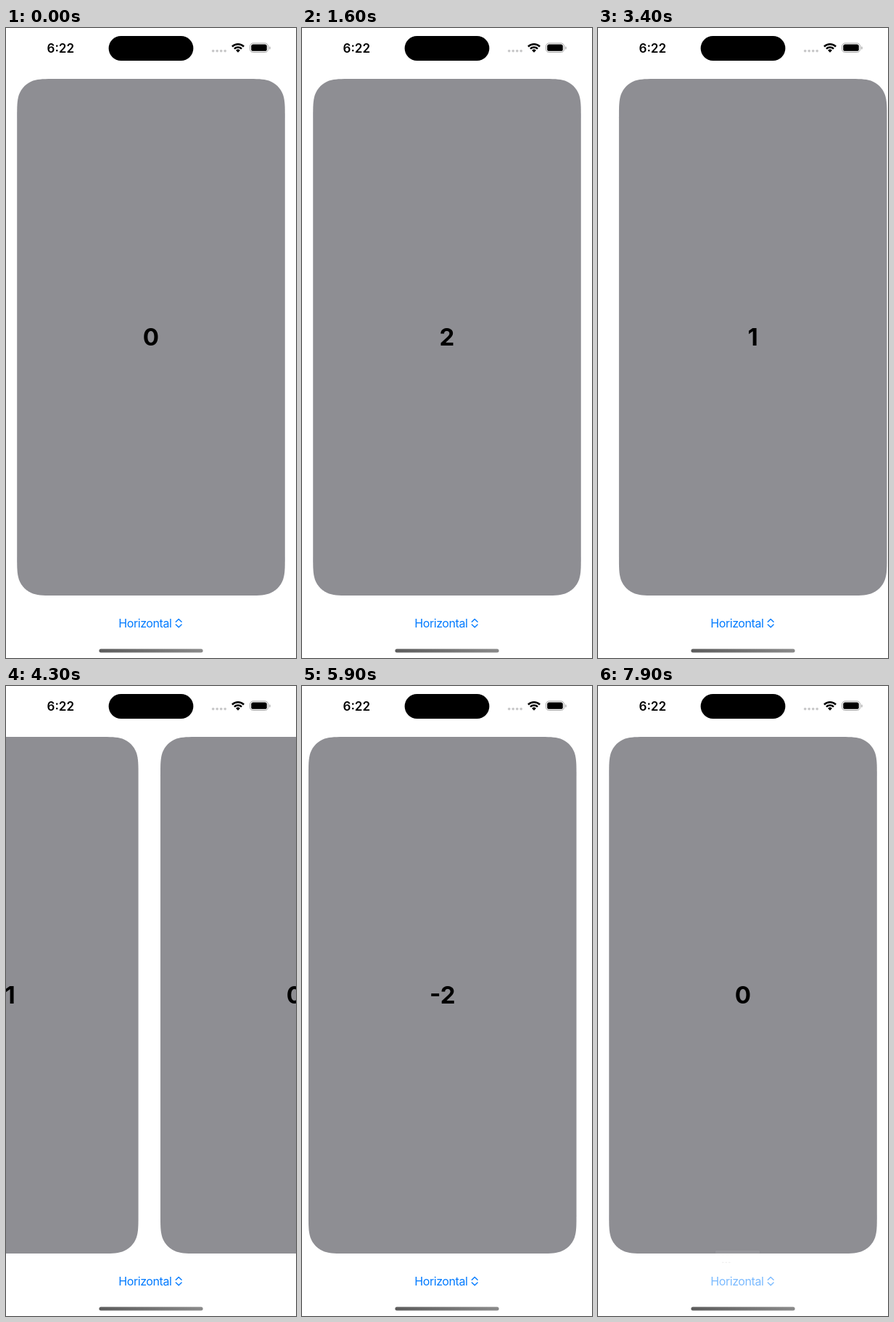
An HTML page with a canvas for the animation above (8000 ms loop, 400 by 867 pixels).

```html
<!DOCTYPE html>
<html lang="en">
<head>
<meta charset="utf-8">
<title>Endless pager</title>
<style>
  html, body { margin: 0; width: 100%; height: 100%; overflow: hidden; background: #fff; }
  canvas { display: block; width: 100vw; height: 100vh; }
</style>
</head>
<body>
<canvas id="stage"></canvas>
<script>
const W = 400, H = 867, LOOP = 8000, TICK = 100;
const FONT = 'Inter, "Open Sans", sans-serif';
const BLUE = '#007aff', GRAY = '#8e8e93';
const CARD = { x: 15.2, y: 70, w: 369.6, h: 711, r: 35 };
const SWIPE = 216;

// Start time of each swipe and the page step it makes
const swipes = [
  [576, 1], [1376, 1], [2576, -1], [3376, -1],
  [4192.8, -1], [5076, -1], [5884, 1], [6749.2, 1]
];

const canvas = document.getElementById('stage');
const ctx = canvas.getContext('2d');

const clamp = v => Math.min(1, Math.max(0, v));
const smooth = u => u * u * (3 - 2 * u);

function pagePosition(t) {
  return swipes.reduce((p, [start, step]) => p + step * smooth(clamp((t - start) / SWIPE)), 0);
}

function pill(x, y, w, h, r, fill) {
  ctx.beginPath();
  ctx.roundRect(x, y, w, h, r);
  ctx.fillStyle = fill;
  ctx.fill();
}

function label(text, x, y, font, fill, align = 'center') {
  ctx.font = `${font} ${FONT}`;
  ctx.fillStyle = fill;
  ctx.textAlign = align;
  ctx.fillText(text, x, y);
}

// One smooth-curvature corner; (ux,uy) runs back along the incoming edge, (vx,vy) along the outgoing one
function corner(x, y, ux, uy, vx, vy, r) {
  const at = (a, b) => [x + r * (a * ux + b * vx), y + r * (a * uy + b * vy)];
  const curve = (a, b, c) => ctx.bezierCurveTo(...at(...a), ...at(...b), ...at(...c));
  ctx.lineTo(...at(1.5287, 0));
  curve([1.0885, 0], [0.8684, 0], [0.6315, 0.0749]);
  curve([0.3728, 0.1691], [0.1691, 0.3728], [0.0749, 0.6315]);
  curve([0, 0.8684], [0, 1.0885], [0, 1.5287]);
}

function card(n, dx) {
  const { y, w, h, r } = CARD, x = CARD.x + dx;
  ctx.beginPath();
  corner(x + w, y, -1, 0, 0, 1, r);
  corner(x + w, y + h, 0, -1, -1, 0, r);
  corner(x, y + h, 1, 0, 0, -1, r);
  corner(x, y, 0, 1, 1, 0, r);
  ctx.closePath();
  ctx.fillStyle = GRAY;
  ctx.fill();
  label(String(n), W / 2 + dx, 437.2, '700 33px', '#000');
}

function pages(t) {
  const pos = pagePosition(t), first = Math.floor(pos);
  for (let n = first; n <= first + 1; n++) {
    const dx = (n - pos) * W;
    if (Math.abs(dx) < W) card(n, dx);
  }
}

function wifi(cx, cy) {
  const a = -Math.PI * 0.75, b = -Math.PI * 0.25;
  ctx.strokeStyle = ctx.fillStyle = '#000';
  ctx.lineWidth = 2.5;
  for (const r of [11.4, 7.2]) {
    ctx.beginPath();
    ctx.arc(cx, cy, r, a, b);
    ctx.stroke();
  }
  ctx.beginPath();
  ctx.moveTo(cx, cy);
  ctx.arc(cx, cy, 4.1, a, b);
  ctx.fill();
}

function battery() {
  ctx.beginPath();
  ctx.roundRect(336.5, 20.9, 25, 12.6, 4.2);
  ctx.lineWidth = 1;
  ctx.strokeStyle = '#a6a6a6';
  ctx.stroke();
  pill(338.2, 22.6, 21.6, 9.2, 2.6, '#000');
  pill(363.1, 25.2, 1.5, 4.2, [0, 1.5, 1.5, 0], '#a6a6a6');
}

function statusBar() {
  label('6:22', 75.3, 33.6, '600 17px', '#000');
  pill(141.6, 11, 116.8, 34, 17, '#000');
  for (let i = 0; i < 4; i++) pill(283.9 + i * 5.5, 29.8, 3.6, 3.6, 1.8, '#c8c8c9');
  wifi(320, 33.7);
  battery();
}

function chevron(x, y, dy) {
  ctx.beginPath();
  ctx.moveTo(x - 3.9, y);
  ctx.lineTo(x, y + dy);
  ctx.lineTo(x + 3.9, y);
  ctx.stroke();
}

function picker(t) {
  ctx.save();
  ctx.globalAlpha = t >= 7900 ? 0.52 : t >= 7800 ? 0.8 : 1;
  ctx.letterSpacing = '-0.4px';
  label('Horizontal', 155.2, 825, '400 16px', BLUE, 'left');
  ctx.strokeStyle = BLUE;
  ctx.lineWidth = 1.4;
  ctx.lineCap = ctx.lineJoin = 'round';
  chevron(238.2, 817.3, -3.7);
  chevron(238.2, 821, 3.7);
  ctx.restore();
}

// First trace of the menu opening above the picker
function menuHint() {
  pill(162, 777, 61, 4, 1, 'rgba(255,255,255,.07)');
  for (let i = 0; i < 4; i++) pill(165 + i * 6, 782, 3, 0.8, 0, 'rgba(0,0,0,.06)');
  for (let i = 0; i < 3; i++) pill(171 + i * 4.5, 792.8, 2.5, 0.8, 0, 'rgba(0,0,0,.1)');
}

function homeBar() {
  const g = ctx.createLinearGradient(128, 0, 272, 0);
  g.addColorStop(0, '#5c5c5c');
  g.addColorStop(1, '#8a8a8a');
  pill(128.4, 854.5, 143.2, 5, 2.5, g);
}

function draw(t) {
  const dpr = window.devicePixelRatio || 1;
  const w = Math.round(innerWidth * dpr), h = Math.round(innerHeight * dpr);
  if (canvas.width !== w || canvas.height !== h) {
    canvas.width = w;
    canvas.height = h;
  }
  ctx.setTransform(w / W, 0, 0, h / H, 0, 0);
  ctx.fillStyle = '#fff';
  ctx.fillRect(0, 0, W, H);
  pages(t);
  statusBar();
  if (t >= 7900) menuHint();
  picker(t);
  homeBar();
}

const start = performance.now();

function frame() {
  const t = (performance.now() - start) % LOOP;
  draw(Math.floor(t / TICK) * TICK);
  requestAnimationFrame(frame);
}
frame();
</script>
</body>
</html>
```
